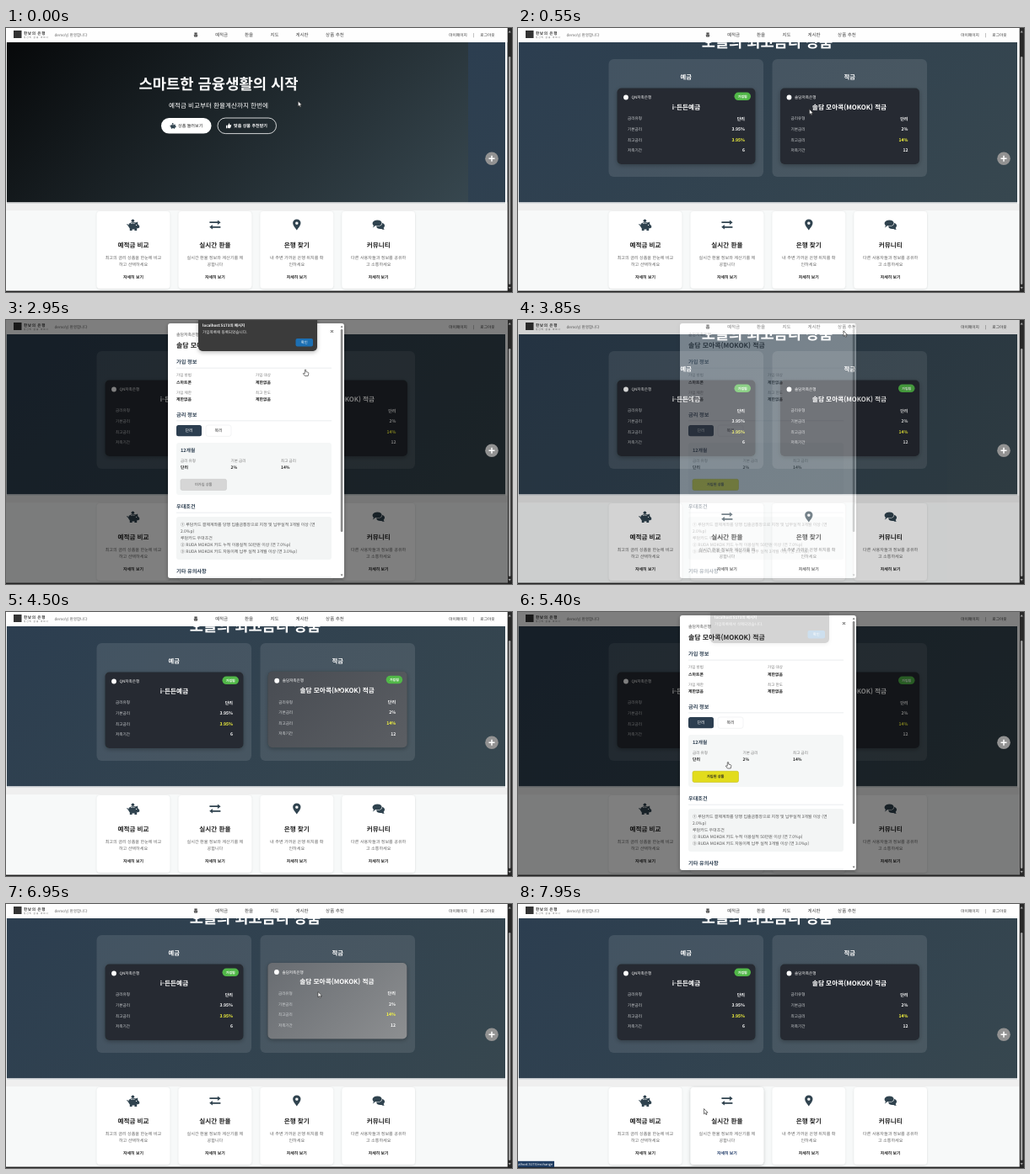
These frames come from a looping animation (600x314 px, 8000 ms). An HTML page:

```html
<!DOCTYPE html>
<html lang="ko">
<head>
<meta charset="utf-8">
<title>한낮의 은행</title>
<style>
html, body { margin: 0; height: 100%; overflow: hidden; background: #fff; }
svg { display: block; width: 100vw; height: 100vh; font-family: "Noto Sans CJK KR", "Noto Sans KR", "Noto Sans", sans-serif; text-rendering: geometricPrecision; }
</style>
</head>
<body>
<svg id="stage" viewBox="0 0 600 314" xmlns="http://www.w3.org/2000/svg"></svg>
<script>
const stage = document.getElementById('stage');
const $ = id => document.getElementById(id);
const INK = '#2c3e50', GREY = '#666', PAGE = 594.7, SLIDE = 592;

// Text is placed by the vertical middle of its line.
const text = (x, mid, size, str, fill = '#fff', weight = 400, anchor = 'start', more = '') =>
  `<text x="${x}" y="${mid + size * .36}" font-size="${size}" fill="${fill}" font-weight="${weight}" text-anchor="${anchor}" ${more}>${str}</text>`;
const centered = (x, mid, size, str, fill, weight, more) => text(x, mid, size, str, fill, weight, 'middle', more);
const box = (x, y, w, h, fill, r = 0, more = '') =>
  `<rect x="${x}" y="${y}" width="${w}" height="${h}" rx="${r}" fill="${fill}" ${more}/>`;
const group = (id, body, more = '') => `<g id="${id}" ${more}>${body}</g>`;
// Runs at a true 135 degrees across a box of the given size.
const gradient = (id, x, y, w, h, from, to) => {
  const cx = x + w / 2, cy = y + h / 2, d = (w + h) / 4;
  return `<linearGradient id="${id}" gradientUnits="userSpaceOnUse" x1="${cx - d}" y1="${cy - d}" x2="${cx + d}" y2="${cy + d}">
    <stop stop-color="${from}"/><stop offset="1" stop-color="${to}"/></linearGradient>`;
};
const shadow = (id, dy, blur, alpha) =>
  `<filter id="${id}" x="-20%" y="-20%" width="140%" height="150%"><feDropShadow dx="0" dy="${dy}" stdDeviation="${blur}" flood-opacity="${alpha}"/></filter>`;

const icons = {
  pig: `<ellipse cx="-.2" cy="1.2" rx="5.7" ry="4.2"/><circle cx="-.6" cy="-4.7" r="1.8"/>
    <path d="M1.500-2L5.200-3.600V-.8L7.200 1.200V3.600L4.600 4.600zM-4.200 3h2.800v4H-4.200zM1.400 3h2.800v4H1.400z"/>
    <path d="M-5.200 1Q-7.400 1.200-7.200-1" fill="none" stroke="currentColor"/><circle cx="3.600" cy=".4" r=".6" fill="#fff"/>
    <path d="M-3-1.500Q-.6-2.400 1.600-1.500" fill="none" stroke="#fff" stroke-width=".7"/>`,
  swap: `<path d="M-6.500-3.700H3V-5.600L6.700-2.800 3 0V-1.900H-6.500zM6.500 1.900H-3V0L-6.700 2.800-3 5.600V3.700H6.500z"/>`,
  pin: `<path fill-rule="evenodd" d="M0 6.600C-2 3.600-4.700.8-4.700-1.900a4.700 4.700 0 0 1 9.400 0C4.700.8 2 3.600 0 6.600zM0-3.600a1.700 1.700 0 1 0 .01 0z"/>`,
  chat: `<path d="M7 5.800Q4.800 5.800 3.600 4.900-2 5.400-2.500 2 4.500 2 4.600-2.200 9.400 0 6 4z"/>
    <path d="M-7 3.400Q-5.800 2.200-5.800.9C-9-2.200-5.600-5.600-1.600-5.600c7.400 0 7.400 7 0 7q-1.200 0-2.200-.3-1.300 1.800-3.200 2.300z"/>`,
  thumb: `<path d="M-5-.8h2.400V5H-5zM-1.600-.6L.7-5.200Q2.600-5 1.900-1.800H5Q5.800-.5 4.800.5 5 2 4 2.600 4.200 4.800 2 5H.2L-1.600 4z"/>`
};
const icon = (name, x, y, scale = 1, color = '#30434f') =>
  `<g fill="${color}" color="${color}" transform="translate(${x} ${y}) scale(${scale})">${icons[name]}</g>`;

const badge = (x, y) => box(x, y, 19.5, 9.6, '#51b748', 4.8) + centered(x + 9.75, y + 4.8, 4, '가입됨', '#fff', 700);

function product(x, bank, name, values) {
  const rows = ['금리유형', '기본금리', '최고금리', '저축기간'].map((label, i) => {
    const y = 107.8 + i * 12.6;
    return text(x + 12.5, y, 4.6, label, '#d2d5d7') +
      text(x + 151.5, y, 5.1, values[i], i == 2 ? '#ffff3e' : '#fff', 700, 'end');
  });
  return `<circle cx="${x + 10.5}" cy="82.5" r="2.9" fill="#fff"/>` +
    text(x + 17, 82.4, 4.6, bank, '#fff', 500) + centered(x + 82, 93.8, 7.7, name, '#fff', 700) + rows.join('');
}

const heroIntro = box(0, 17, SLIDE, 192, 'url(#night)') +
  centered(296, 67, 17.7, '스마트한 금융생활의 시작', '#fff', 700) +
  centered(296, 91.9, 7.6, '예적금 비교부터 환율계산까지 한번에', '#fff', 500) +
  box(228, 107, 59.5, 18.6, '#fff', 9.3) + icon('pig', 242, 116.3, .5) +
  text(248, 116.4, 5.05, '상품 둘러보기', '#222', 500) +
  box(295, 107, 69.5, 18.6, 'none', 9.3, 'stroke="#fff" stroke-width=".8"') + icon('thumb', 308, 116.3, .6, '#fff') +
  text(314, 116.4, 5.05, '맞춤 상품 추천받기', '#fff', 700);

const heroBest = `<g transform="translate(${SLIDE})">` + box(0, 17, SLIDE, 192, 'url(#dusk)') +
  centered(295.5, 17, 17.6, '오늘의 최고금리 상품', '#fff', 700) +
  [[107.5, '예금'], [301.5, '적금']].map(([x, title]) =>
    box(x, 37, 183.5, 140, '#fff', 6, 'fill-opacity=".1"') + centered(x + 91.7, 58.7, 7.3, title, '#fff', 700)).join('') +
  box(117.5, 71.5, 164, 90.5, '#262c31', 5, 'filter="url(#soft)"') +
  product(117.5, 'QN저축은행', 'i-든든예금', ['단리', '3.95%', '3.95%', '6']) + badge(256.5, 76.5) +
  group('saving', box(311, 71.5, 165, 90.5, '#262c31', 5, 'filter="url(#soft)"') +
    box(311, 71.5, 165, 90.5, 'url(#silver)', 5, 'id="glow"') +
    product(311, '솔담저축은행', '솔담 모아콕(MOKOK) 적금', ['단리', '2%', '14%', '12']) +
    group('joinedBadge', badge(451, 76.5))) + '</g>';

const features = [
  ['pig', '예적금 비교', '최고의 금리 상품을 한눈에 비교', '하고 선택하세요'],
  ['swap', '실시간 환율', '실시간 환율 정보와 계산기를 제', '공합니다'],
  ['pin', '은행 찾기', '내 주변 가까운 은행 위치를 확', '인하세요'],
  ['chat', '커뮤니티', '다른 사용자들과 정보를 공유하', '고 소통하세요']
].map(([name, title, line1, line2], i) => {
  const x = 107.7 + i * 96.9, mid = x + 43.3;
  return box(x, 218, 86.6, 92, '#fff', 4, 'filter="url(#faint)"') +
    (i == 1 ? box(x, 218, 86.6, 92, '#fff', 4, 'id="lift" filter="url(#soft)"') : '') +
    icon(name, mid, 234) + centered(mid, 258.5, 7.6, title, '#222', 700) +
    centered(mid, 272.7, 5.1, line1, GREY) + centered(mid, 281, 5.1, line2, GREY) +
    centered(mid, 296.3, 4.9, '자세히 보기', '#222', 700, i == 1 ? 'id="link"' : '');
}).join('');

const nav = box(0, 0, PAGE, 17, '#fefefe') + box(9, 3, 9.5, 9, '#333') +
  text(21, 6, 4.6, '한낮의 은행', '#333', 700, 'start', 'letter-spacing=".6"') +
  text(21, 10.7, 2.5, '당신의 금융 파트너', '#555', 400, 'start', 'letter-spacing="1"') +
  text(57.5, 8.4, 4.6, 'demo님 환영합니다', GREY) +
  [[225, '홈'], [255.5, '예적금'], [288, '환율'], [318.5, '지도'], [351, '게시판'], [390, '상품 추천']].map(([x, s], i) =>
    centered(x, 8.3, 5.5, s, i ? '#444' : '#111', i ? 500 : 700)).join('') +
  [[536, '마이페이지'], [554.3, '|'], [571, '로그아웃']].map(([x, s]) => centered(x, 8.3, 4.7, s, '#333')).join('');

const heading = (y, s) => text(202, y, 6.15, s, INK, 700) + box(202, y + 6.8, 184, .6, '#dde1e4');
const field = (x, y, label, value) => text(x, y, 4.5, label, '#777') + text(x, y + 8.6, 4.9, value, '#222', 700);
const notes = ['① 루담카드 결제계좌를 당행 입출금통장으로 지정 및 납부실적 3개월 이상 (연', '2.0%p)', '루담카드 우대조건',
  '② RUDA MOKOK 카드 누적 이용실적 50만원 이상 (연 7.0%p)', '③ RUDA MOKOK 카드 자동이체 납부 실적 3개월 이상 (연 3.0%p)'];

const modal = box(0, 0, PAGE, 313, '#000', 0, 'fill-opacity=".5"') +
  box(192, 4, 209, 303, '#fff', 3, 'filter="url(#soft)"') +
  text(202, 17.6, 4.9, '솔담저축은행', '#555') + text(202, 30, 7.9, '솔담 모아콕(MOKOK) 적금', '#222', 700) +
  '<path d="M385 12l3 3m0-3l-3 3" stroke="#333" stroke-width=".8"/>' +
  heading(50, '가입 정보') + field(202, 65.6, '가입 방법', '스마트폰') + field(296, 65.6, '가입 대상', '제한없음') +
  field(202, 86, '가입 제한', '제한없음') + field(296, 86, '최고 한도', '제한없음') +
  heading(112.8, '금리 정보') + box(202, 125, 30, 13.3, INK, 2.5) + centered(217, 131.7, 4.9, '단리', '#fff', 500) +
  box(237, 125, 30, 13.3, '#fff', 2.5, 'stroke="#e4e7e9" stroke-width=".5"') + centered(252, 131.7, 4.9, '복리', '#333', 500) +
  box(202, 146, 184, 62, '#f5f7f7', 3) + text(207, 155, 5.7, '12개월', INK, 700) +
  field(207, 167, '금리 유형', '단리') + field(266.5, 167, '기본 금리', '2%') + field(326, 167, '최고 금리', '14%') +
  box(207, 189.3, 54.5, 13.2, '#eee', 2, 'id="join" stroke-width=".6"') +
  centered(234.2, 195.9, 4.2, '미가입 상품', '#555', 400, 'id="joinLabel"') +
  heading(222, '우대조건') + box(202, 234, 184, 51, '#f3f5f5', 3) +
  notes.map((s, i) => text(207, 243.6 + i * 8, 4.95, s, '#555')).join('') +
  text(202, 299, 6.15, '기타 유의사항', INK, 700) + box(202, 305.7, 184, .6, '#dde1e4') +
  box(396.8, 11, 2.6, 241, '#8a8a8a', 1.3) +
  '<path d="M398.1 6.8l1.4 2h-2.8zM398.1 304.5l1.4-2h-2.8z" fill="#666"/>';

const alertBox = box(228, -6, 141, 43, '#3a3a3a', 5, 'filter="url(#soft)"') +
  text(233, 6, 4.5, 'localhost:5173의 메시지', '#fff', 700) + text(233, 14.5, 4.6, '', '#eee', 400, 'start', 'id="message"') +
  box(343.5, 22, 20.5, 9.6, '#1c6fb3', 2) + centered(353.7, 26.8, 4.3, '확인', '#fff', 500);

stage.innerHTML = '<defs>' + gradient('night', 0, 17, SLIDE, 192, '#040506', '#37474f') +
  gradient('dusk', 0, 17, SLIDE, 192, '#2c3e50', '#37474f') + gradient('silver', 311, 71, 165, 91, '#686c71', '#8d8f91') +
  shadow('faint', .5, 1, .13) + shadow('soft', 1.5, 2.5, .28) + '</defs>' +
  group('hero', heroIntro + heroBest) + nav +
  box(0, 17, .9, 192, '#fff') + box(SLIDE, 17, PAGE - SLIDE, 192, '#fff') +
  box(0, 207.3, PAGE, 1.5, '#fff') + box(0, 208.8, PAGE, 8.7, '#efefef') + box(0, 217.5, PAGE, 97, '#f7f9f9') + features +
  group('modal', modal) +
  '<circle cx="576" cy="155.3" r="7.8" fill="#929292"/><path d="M572.5 155.3h7m-3.5-3.5v7" stroke="#fff" stroke-width="1.5"/>' +
  group('alert', alertBox) +
  box(PAGE, 0, 600 - PAGE, 314, '#292929') + box(596, 34, 2.4, 271, '#9f9f9f', 1.2) +
  '<path d="M597.2 3l1.6 2.6h-3.2zM597.2 310.500l1.600-2.600h-3.200z" fill="#9f9f9f"/>' + box(0, 312.6, 600, 1.4, '#222') +
  group('status', box(0, 305.8, 43, 7.4, '#1f3d63') + text(41, 309.3, 4, 'localhost:5173/exchange', '#fff', 400, 'end')) +
  group('cursor', '<path id="arrow" d="M0 0V6.300L1.500 5 2.500 7.200 3.500 6.800 2.600 4.600H4.600z"/>' +
    '<path id="hand" d="M-.7 3.800V.3Q0-.6.7.3V2.600L3.200 3.200Q3.900 3.500 3.800 4.600L3.200 7.500H-.6L-2.700 4.700Q-2.200 3.600-.7 4.800z"/>',
    'fill="#fff" stroke="#222" stroke-width=".6"');

const ease = u => u * u * (3 - 2 * u);
const ramp = (t, a, b) => ease(Math.min(1, Math.max(0, (t - a) / (b - a))));
// Rises over the first pair of times and falls over the second.
const pulse = (t, a, b, c, d) => ramp(t, a, b) - ramp(t, c, d);

// time, x, y
const path = [[0, 346.3, 87], [250, 346, 88], [800, 345, 103], [950, 345, 103], [1200, 327.5, 100], [1700, 327, 100], [2050, 240, 196],
  [2550, 240, 196], [2950, 355, 59], [3100, 354, 27], [3350, 354, 27], [3600, 386, 13], [4450, 386, 13], [4500, 394, 89], [4700, 390, 95],
  [4850, 390, 95], [5200, 249, 178.5], [5480, 249, 178.5], [5800, 354, 27], [6150, 354, 27], [6300, 386, 13], [6380, 386, 13],
  [6550, 384, 86], [6850, 384, 86], [6950, 370, 104.5], [7150, 345, 130], [7650, 219, 247], [7950, 220.5, 243.5]];

function pointer(t) {
  const i = path.findIndex(p => p[0] > t);
  if (i < 0) return path.at(-1).slice(1);
  const [t0, x0, y0] = path[i - 1], [t1, x1, y1] = path[i], u = ramp(t, t0, t1);
  return [x0 + (x1 - x0) * u, y0 + (y1 - y0) * u];
}

const set = (id, attrs) => { for (const k in attrs) $(id).setAttribute(k, attrs[k]); };
const show = (id, on) => set(id, { opacity: +on });

function draw(t) {
  const joined = t >= 3340 && t < 6000;
  const pressed = t >= 2350 && t < 3340;
  const hand = t >= 2350 && t < 3050 || t >= 5200 && t < 5600;
  const hover = pulse(t, 650, 800, 1600, 1750) + pulse(t, 4450, 4550, 4800, 5000) + pulse(t, 6400, 6550, 7100, 7250);

  set('hero', { transform: `translate(${-SLIDE * ramp(t, -92, 465)})` });
  set('saving', { transform: `translate(${-.6 * hover} ${-1.5 * hover})` });
  show('glow', hover);
  show('joinedBadge', t >= 3400 && t < 6000);
  show('modal', pulse(t, 900, 1100, 3700, 3950) + pulse(t, 4750, 4950, 6380, 6550));
  show('alert', pulse(t, 2560, 2700, 3200, 3320) + pulse(t, 5350, 5520, 5880, 6000));
  $('message').textContent = t < 4500 ? '가입목록에 등록되었습니다.' : '가입목록에서 삭제되었습니다.';

  set('join', { fill: joined ? '#e2dc1c' : pressed ? '#d6d6d6' : '#eee', stroke: joined ? '#c5bf20' : pressed ? '#ccc' : '#e6e6e6' });
  set('joinLabel', { 'font-weight': joined ? 700 : 400, fill: joined ? '#222' : '#555' });
  $('joinLabel').textContent = joined ? '가입된 상품' : '미가입 상품';

  show('lift', .5 * ramp(t, 7450, 7650));
  set('link', { fill: t >= 7700 ? '#1f3a68' : '#222' });
  show('status', ramp(t, 7690, 7800));
  set('cursor', { transform: `translate(${pointer(t)})` });
  show('arrow', !hand);
  show('hand', hand);
}

const start = performance.now();
function tick() {
  draw((performance.now() - start) % 8000);
  requestAnimationFrame(tick);
}
tick();
</script>
</body>
</html>
```
